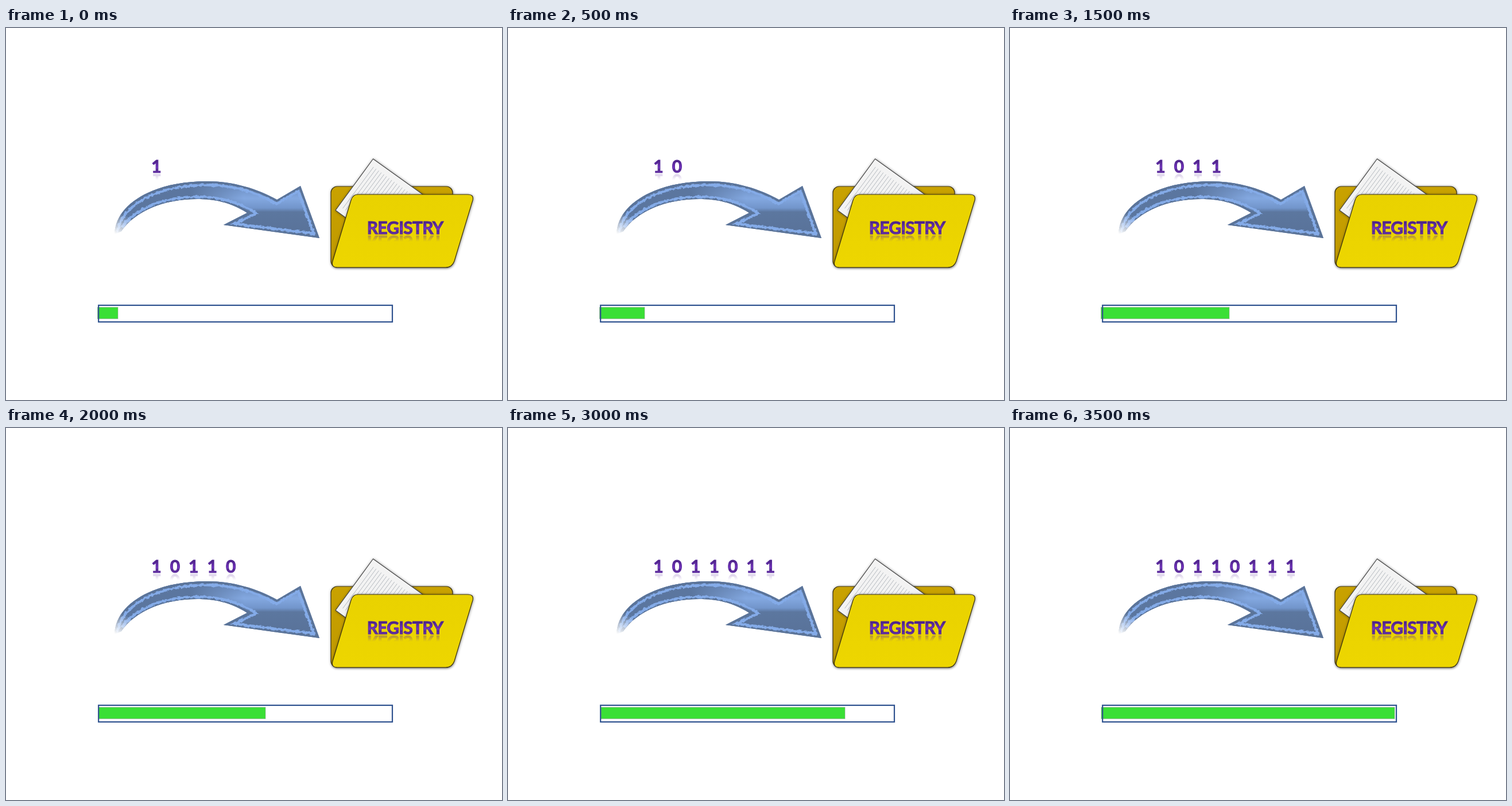
An HTML page for the animation above (4 s loop, 864 by 648 pixels).

```html
<!DOCTYPE html>
<html lang="en">
<head>
<meta charset="utf-8">
<title>Registry upload</title>
<style>
  html, body { margin: 0; width: 100%; height: 100%; overflow: hidden; background: #fff; }
  svg { display: block; width: 864px; height: 648px; }
  text { font: 700 30px Carlito, Lato, "Open Sans", sans-serif; text-anchor: middle; fill: url(#ink); stroke: #55289a; stroke-width: 1; }
  #label text { letter-spacing: -.8px; }
  #digits .mirror { opacity: .6; }
</style>
</head>
<body>
<svg viewBox="0 0 864 648">
  <defs>
    <linearGradient id="ink" gradientUnits="userSpaceOnUse" x1="0" y1="-21" x2="0" y2="0">
      <stop offset="0" stop-color="#4b2482"/>
      <stop offset=".45" stop-color="#7030b8"/>
      <stop offset=".6" stop-color="#7637c4"/>
      <stop offset=".75" stop-color="#54298c"/>
      <stop offset="1" stop-color="#6a31aa"/>
    </linearGradient>
    <linearGradient id="fade" gradientUnits="userSpaceOnUse" x1="0" y1="1" x2="0" y2="13">
      <stop offset="0" stop-color="#fff" stop-opacity=".45"/>
      <stop offset="1" stop-color="#fff" stop-opacity="0"/>
    </linearGradient>
    <mask id="mirror" maskUnits="userSpaceOnUse" x="-90" y="0" width="180" height="14">
      <rect x="-90" y="0" width="180" height="14" fill="url(#fade)"/>
    </mask>

    <path id="arrow" d="M189 359C191 306 257 267 350 267C396 267 438 280 472 299L513 275L546 366L379 343L420 322C390 303 362 298 333 298C270 298 222 322 201 354Z"/>
    <clipPath id="arrowClip"><use href="#arrow"/></clipPath>
    <linearGradient id="body" gradientUnits="userSpaceOnUse" x1="0" y1="267" x2="0" y2="366">
      <stop offset="0" stop-color="#6686b8"/>
      <stop offset=".3" stop-color="#83a8e0"/>
      <stop offset=".47" stop-color="#7295cb"/>
      <stop offset=".54" stop-color="#5c779f"/>
      <stop offset="1" stop-color="#587198"/>
    </linearGradient>
    <linearGradient id="shade" gradientUnits="userSpaceOnUse" x1="320" y1="292" x2="410" y2="274">
      <stop offset="0" stop-color="#5b769f"/>
      <stop offset="1" stop-color="#5b769f" stop-opacity="0"/>
    </linearGradient>
    <linearGradient id="tail" gradientUnits="userSpaceOnUse" x1="192" y1="360" x2="209" y2="326">
      <stop offset="0" stop-color="#000"/>
      <stop offset="1" stop-color="#fff"/>
    </linearGradient>
    <mask id="tailMask" maskUnits="userSpaceOnUse" x="180" y="260" width="380" height="115">
      <rect x="180" y="260" width="380" height="115" fill="url(#tail)"/>
    </mask>
    <filter id="chalk" filterUnits="userSpaceOnUse" x="180" y="260" width="380" height="115" color-interpolation-filters="sRGB">
      <feTurbulence type="fractalNoise" baseFrequency=".2" numOctaves="2" seed="4"/>
      <feDisplacementMap in="SourceGraphic" scale="5" xChannelSelector="R" yChannelSelector="G"/>
    </filter>

    <filter id="soft" x="-10%" y="-10%" width="120%" height="120%">
      <feDropShadow dx="0.5" dy="0.5" stdDeviation="2" flood-color="#000" flood-opacity=".45"/>
    </filter>
    <linearGradient id="back" x1="0" y1="0" x2="0" y2="1">
      <stop offset="0" stop-color="#c9a200"/>
      <stop offset="1" stop-color="#bf9800"/>
    </linearGradient>
    <linearGradient id="front" x1="0" y1="0" x2="0" y2="1">
      <stop offset="0" stop-color="#e9d200"/>
      <stop offset="1" stop-color="#edd600"/>
    </linearGradient>
  </defs>

  <g mask="url(#tailMask)">
    <use href="#arrow" fill="url(#body)"/>
    <use href="#arrow" fill="url(#shade)"/>
    <g clip-path="url(#arrowClip)" fill="none">
      <use href="#arrow" stroke="#5b7499" stroke-width="8"/>
      <path filter="url(#chalk)" stroke="#84abe8" stroke-width="4.6" d="M194 357C199 309 264 273.500 350 273.500C396 273.500 438 287 471 306L509 284L536 358L398 341L436 323C402 300 364 294 333 294C272 294 222 317 201 348"/>
    </g>
  </g>

  <g stroke="#3d3410" stroke-width="1.2" stroke-linejoin="round">
    <rect x="566" y="276" width="212" height="141" rx="11" fill="url(#back)" filter="url(#soft)"/>
    <g filter="url(#soft)">
      <path d="M639.500 228L727.500 291L661 381L574 317.500Z" fill="#f3f3f3" stroke="#444"/>
      <path id="lines" fill="none" stroke="#b3b8be" stroke-width="1"/>
    </g>
    <path filter="url(#soft)" fill="url(#front)" d="M613 290H804Q815.500 290 813 300L781 406Q777 417 766 417H577Q566 417 569 406L601 300Q604 290 613 290Z"/>
  </g>
  <g id="label"></g>
  <g id="digits"></g>

  <rect id="bar" y="486.5" height="20" fill="#3adf36" stroke="#8d9b8d" stroke-opacity=".55" stroke-width="1"/>
  <rect x="161.2" y="483" width="511.8" height="29" fill="none" stroke="#2f528f" stroke-width="2.2"/>
</svg>
<script>
  const $ = id => document.getElementById(id);
  const STEP = 500;
  const BITS = "10110111";
  const STARTS = [159.5, 159.5, 159.5, 158.5, 161, 162, 162, 159];
  const ENDS = [195, 238, 280, 382, 452, 523, 587, 670];

  // Text standing on its baseline with a fading reflection below it.
  const word = (text, x, y) => `<g transform="translate(${x} ${y})">
    <text>${text}</text>
    <g class="mirror" mask="url(#mirror)"><text transform="translate(0 2.5) scale(1 -1)">${text}</text></g></g>`;

  $("label").innerHTML = word("REGISTRY", 695, 359);
  $("digits").innerHTML = [...BITS].map((b, i) => word(b, 262 + i * 32.4, 252)).join("");

  // Ruled lines run parallel to the sheet's left edge.
  const onSheet = (u, v) => `${(639.5 + u * .813 - v * .596).toFixed(1)} ${(228 + u * .582 + v * .803).toFixed(1)}`;
  let rules = "";
  for (let u = 9; u < 102; u += 5.6) rules += `M${onSheet(u, 11)}L${onSheet(u, 101)}`;
  $("lines").setAttribute("d", rules);

  const digits = [...$("digits").children];
  const start = performance.now();
  let shown = -1;

  function draw(time) {
    const step = Math.floor(time / STEP) % BITS.length;
    if (step === shown) return;
    shown = step;
    digits.forEach((d, i) => d.setAttribute("visibility", i <= step ? "visible" : "hidden"));
    $("bar").setAttribute("x", STARTS[step]);
    $("bar").setAttribute("width", ENDS[step] - STARTS[step]);
  }

  function tick() {
    draw(performance.now() - start);
    requestAnimationFrame(tick);
  }
  tick();
</script>
</body>
</html>
```
